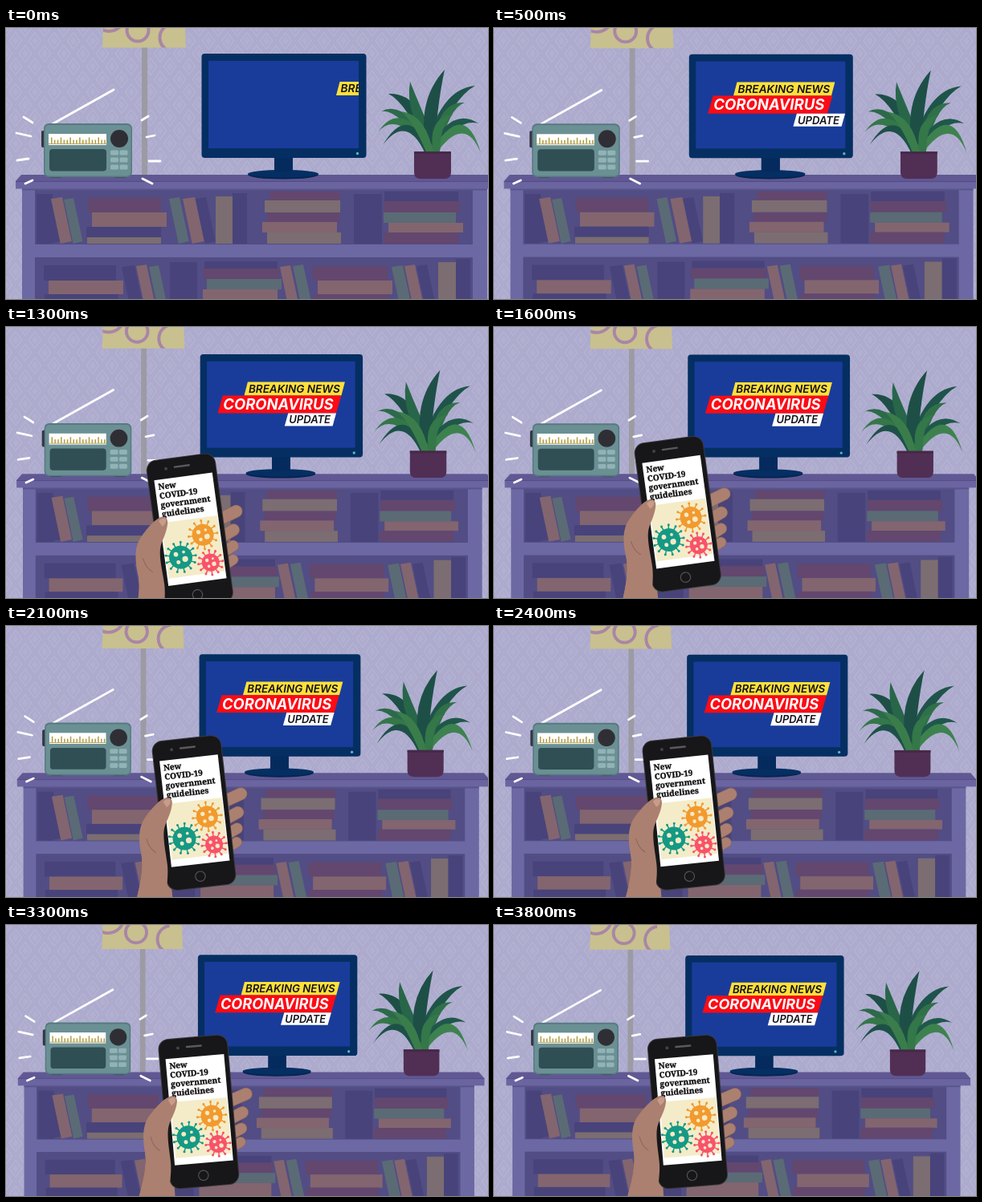
An HTML page with a canvas that plays this animation: 600x338 px, repeating every 3.9 s.

```html
<!DOCTYPE html>
<html lang="en">
<head>
<meta charset="utf-8">
<title>Staying informed at home</title>
<style>
html, body { margin: 0; width: 100%; height: 100%; overflow: hidden; background: #b1aed1; }
canvas { display: block; width: 600px; height: 338px; }
</style>
</head>
<body>
<canvas id="stage" width="600" height="338"></canvas>
<script>
const ctx = document.getElementById('stage').getContext('2d');
const LOOP = 3900, STEP = 100;

const clamp = v => Math.max(0, Math.min(1, v));
const easeOut = v => 1 - Math.pow(1 - clamp(v), 3);

function rect(x, y, w, h, fill) {
  ctx.fillStyle = fill;
  ctx.fillRect(x, y, w, h);
}

function rounded(x, y, w, h, r, fill) {
  ctx.beginPath();
  ctx.roundRect(x, y, w, h, r);
  ctx.fillStyle = fill;
  ctx.fill();
}

function ellipse(x, y, rx, ry, fill) {
  ctx.beginPath();
  ctx.ellipse(x, y, rx, ry, 0, 0, Math.PI * 2);
  ctx.fillStyle = fill;
  ctx.fill();
}

function arc(x, y, r, width, color, from = 0, to = Math.PI * 2) {
  ctx.beginPath();
  ctx.arc(x, y, r, from, to);
  ctx.lineWidth = width;
  ctx.strokeStyle = color;
  ctx.stroke();
}

function poly(points, fill) {
  ctx.beginPath();
  points.forEach(([x, y]) => ctx.lineTo(x, y));
  ctx.closePath();
  ctx.fillStyle = fill;
  ctx.fill();
}

function line(x1, y1, x2, y2, width, color, cap = 'butt') {
  ctx.beginPath();
  ctx.moveTo(x1, y1);
  ctx.lineTo(x2, y2);
  ctx.lineWidth = width;
  ctx.lineCap = cap;
  ctx.strokeStyle = color;
  ctx.stroke();
}

function path(d, fill, stroke, width = 1) {
  const p = new Path2D(d);
  if (fill) { ctx.fillStyle = fill; ctx.fill(p); }
  if (stroke) { ctx.strokeStyle = stroke; ctx.lineWidth = width; ctx.stroke(p); }
}

function text(str, x, y, font, fill) {
  ctx.font = font;
  ctx.fillStyle = fill;
  ctx.fillText(str, x, y);
}

// ---- Wallpaper ----
function diamond(x, y, w, h, color) {
  path(`M${x} ${y - h}L${x + w} ${y}L${x} ${y + h}L${x - w} ${y}Z`, null, color, 1.6);
}

function drawWall() {
  rect(0, 0, 600, 338, '#b2b0d1');
  for (let row = 0; row < 24; row++) {
    for (let col = 0; col < 27; col++) {
      const x = col * 24 + (row % 2) * 12, y = row * 16;
      diamond(x, y, 10.5, 14, '#aba8cc');
      diamond(x, y, 5, 7, '#acaacd');
    }
  }
}

// ---- Bookcase ----
const BOOK = { n: '#48437a', p: '#83656f', g: '#5a6b75', m: '#63476e', t: '#7b6d71' };

const UPPER_FLAT = [
  ['n', 38, 207, 20, 62], ['m', 102, 212, 91, 18], ['p', 107, 230, 93, 18], ['n', 100, 248, 93, 13],
  ['t', 101, 261, 92, 8], ['t', 261, 210, 21, 59], ['n', 282, 206, 18, 63], ['m', 328, 204, 88, 11],
  ['t', 322, 215, 94, 15], ['m', 325, 230, 90, 12], ['p', 319, 242, 93, 13], ['t', 325, 255, 92, 14],
  ['n', 433, 207, 35, 62], ['n', 471, 204, 92, 12], ['m', 471, 216, 94, 14], ['g', 470, 230, 90, 13],
  ['p', 476, 243, 93, 12], ['m', 470, 255, 93, 14]
];
const LOWER_FLAT = [
  ['n', 47, 296, 90, 19], ['p', 53, 315, 93, 17], ['n', 48, 332, 92, 15], ['n', 204, 292, 34, 55],
  ['n', 247, 291, 91, 9], ['m', 246, 300, 94, 13], ['g', 250, 313, 93, 13], ['p', 245, 326, 93, 21],
  ['m', 382, 297, 93, 18], ['p', 388, 315, 93, 17], ['m', 383, 332, 93, 15],
  ['t', 538, 292, 22, 55], ['n', 560, 288, 18, 59]
];
// color, left, top, thickness
const UPPER_LEANING = [
  ['n', 41, 213, 15], ['p', 56, 213, 14], ['g', 72, 214, 12],
  ['g', 203, 213, 13], ['p', 220, 213, 15], ['n', 236, 213, 13]
];
const LOWER_LEANING = [
  ['n', 144, 298, 16], ['p', 162, 297, 13], ['g', 178, 298, 12], ['p', 341, 298, 13],
  ['g', 357, 297, 13], ['g', 480, 298, 14], ['p', 496, 297, 13], ['n', 511, 297, 13]
];

function leaningBook([tone, x, top, w], floor) {
  const dx = (floor - top) * 0.21;
  poly([[x, top], [x + w, top - 2], [x + w + dx, floor - 3], [x + dx, floor]], BOOK[tone]);
}

function drawBookcase() {
  rect(20, 196, 579, 170, '#6c68a3');
  rect(36, 202, 545, 68, '#524d84');
  rect(36, 286, 545, 80, '#524d84');
  [...UPPER_FLAT, ...LOWER_FLAT].forEach(([tone, x, y, w, h]) => rect(x, y, w, h, BOOK[tone]));
  UPPER_LEANING.forEach(b => leaningBook(b, 269));
  LOWER_LEANING.forEach(b => leaningBook(b, 354));
  poly([[19, 183], [605, 183], [612, 191], [12, 191]], '#605893');
  rect(12, 191, 600, 9.5, '#6a65a1');
  rect(12, 191, 600, 1, '#544b86');
  rect(20, 200.5, 579, 2, '#5a548c');
}

// ---- Lamp ----
function drawLamp() {
  rect(169, 20, 7, 165, '#9c9aa3');
  ctx.save();
  ctx.beginPath();
  [[122, -30], [222, -30], [224, 24.5], [120, 24.5]].forEach(p => ctx.lineTo(...p));
  ctx.clip();
  rect(110, -40, 120, 70, '#c8c08f');
  arc(128, -16, 20, 4, '#a986a5');
  arc(164, 3, 13.5, 4, '#a986a5');
  arc(209, 12, 17.5, 4, '#a986a5', 1.5, 4.6);
  ctx.restore();
}

// ---- Radio ----
const RAYS = [
  [22, 111, 33, 118], [13, 131, 31, 135], [14, 165, 28, 163], [24, 194, 33, 190],
  [169, 115, 177, 110], [175, 136, 185, 134], [178, 166, 192, 166], [170, 188, 182, 194]
];

function drawRadio() {
  line(59, 119, 134, 77, 2.8, '#fff', 'round');
  rounded(44, 128, 6, 21, 2, '#343641');
  rect(55, 184, 14, 3, '#3d5960');
  rect(135, 184, 14, 3, '#3d5960');
  rounded(47, 119, 110, 67, 6, '#557a80');
  rounded(48.5, 121, 107, 63.5, 5, '#6b9094');
  rect(53, 132, 72, 14, '#fff');
  for (let i = 0; i < 18; i++) {
    const h = i % 3 ? 5 : 8;
    rect(56 + i * 3.9, 144.5 - h, 1.5, h, '#b39a3c');
  }
  rect(53, 144, 72, 1, '#b8aa69');
  ellipse(141, 138, 11, 11, '#302e35');
  rounded(54, 151, 71, 27.5, 4, '#304f55');
  for (let i = 0; i < 6; i++) {
    rounded(130 + (i % 2) * 11.5, 152.5 + Math.floor(i / 2) * 9, 10, 6, 1.5, '#91b3b6');
  }
  RAYS.forEach(ray => line(...ray, 2.8, '#fff', 'round'));
}

// ---- Television ----
const SANS = 'Inter, "Open Sans", sans-serif';
const BANNERS = [
  { str: 'BREAKING NEWS', x: 299, y: 67, w: 127, h: 17, slant: 4.5, font: '600 13.7px', pad: 5.5, base: 80.4, fill: '#ffe03a', ink: '#11121c', from: 112, start: 0, span: 400 },
  { str: 'CORONAVIRUS', x: 265.5, y: 84, w: 156, h: 22.3, slant: 6.5, font: '700 18.7px', pad: 7, base: 102, fill: '#fb0b15', ink: '#fff', from: 190, start: 100, span: 500 },
  { str: 'UPDATE', x: 350, y: 106.3, w: 65, h: 16.2, slant: 4.5, font: '600 13.2px', pad: 5.5, base: 119.2, fill: '#fff', ink: '#11121c', from: 110, start: 300, span: 500 }
];

function drawTV(t) {
  rect(334, 160, 23, 20, '#042654');
  ellipse(345, 183, 44, 5.5, '#03254f');
  ellipse(345, 181.8, 44, 4.8, '#052f62');
  rect(334, 162, 23, 17, '#052b5e');
  rounded(243.5, 32, 205, 130, 4, '#052f62');
  rect(252, 41, 187, 109, '#193c9b');
  ellipse(437.5, 156.5, 1.7, 1.7, '#5bb8b5');
  ctx.save();
  ctx.beginPath();
  ctx.rect(252, 41, 187, 109);
  ctx.clip();
  BANNERS.forEach(b => {
    const x = b.x + b.from * (1 - easeOut((t - b.start) / b.span));
    poly([[x + b.slant, b.y], [x + b.w, b.y], [x + b.w - b.slant, b.y + b.h], [x, b.y + b.h]], b.fill);
    text(b.str, x + b.pad, b.base, `italic ${b.font} ${SANS}`, b.ink);
  });
  ctx.restore();
}

// ---- Plant ----
// tip x, tip y, middle x, middle y, width, color
const LEAVES = [
  [584, 72, 551, 98, 10, '#1f544a'], [476, 82, 506, 103, 12, '#1d4f47'], [571, 93, 548, 110, 9, '#2f7049'],
  [588, 119, 558, 121, 9, '#1f584a'], [467, 104, 496, 112, 8, '#2c6a4a'], [503, 67, 513, 108, 11, '#286649'],
  [546, 52, 530, 100, 14, '#1d4f47'], [463, 130, 494, 118, 9, '#347748'], [469, 146, 499, 125, 8, '#1d5148'],
  [591, 156, 566, 126, 11, '#3d824e'], [556, 108, 539, 124, 9, '#347748'], [492, 104, 513, 122, 9, '#3a7d4b']
];

function drawPlant() {
  const rootY = 157;
  LEAVES.forEach(([x, y, mx, my, width, color], i) => {
    const root = 525 + (i * 5) % 13;
    const bx = 2 * mx - (root + x) / 2, by = 2 * my - (rootY + y) / 2;
    const length = Math.hypot(x - root, y - rootY);
    const nx = (y - rootY) / length * width, ny = (root - x) / length * width;
    path(`M${root - 4} ${rootY}Q${bx + nx} ${by + ny} ${x} ${y}Q${bx - nx} ${by - ny} ${root + 4} ${rootY}Z`, color);
  });
  path('M508 154H554V180Q554 188 546 188H516Q508 188 508 180Z', '#512f54');
  rect(508, 154, 46, 3, '#462848');
}

// ---- Phone and hand ----
const SKIN = '#ab8070', SKIN_DARK = '#8d6558';
const VIRUSES = [
  [15.6, 6.5, 13.5, '#f29a2e', 12], [-15.5, 30.5, 14.5, '#149985', 13], [20.5, 42, 11, '#f9526a', 12]
];

function drawVirus([x, y, r, color, count]) {
  for (let i = 0; i < count; i++) {
    const a = i / count * Math.PI * 2, c = Math.cos(a), s = Math.sin(a);
    line(x + c * r * 0.9, y + s * r * 0.9, x + c * (r + 4), y + s * (r + 4), 1.5, color);
    ellipse(x + c * (r + 4.3), y + s * (r + 4.3), 1.5, 1.5, color);
  }
  ellipse(x, y, r, r, color);
  [[-0.38, -0.3, 0.2], [0.3, -0.42, 0.13], [0.36, 0.2, 0.25], [-0.25, 0.4, 0.17]].forEach(([dx, dy, k]) =>
    ellipse(x + dx * r, y + dy * r, k * r, k * r, '#f5e9c5'));
}

function drawPhone() {
  ctx.save();
  ctx.translate(241, 233);
  ctx.rotate(-4.7 * Math.PI / 180);
  rounded(-43.5, -94, 87, 188, 13, '#3b393c');
  rounded(-42.5, -93, 85, 186, 12, '#171618');
  line(-8, -82, 10, -82, 2.4, '#5b595c', 'round');
  ellipse(-19, -81.5, 2, 2, '#434147');
  arc(-1, 79.5, 6.2, 1.2, '#555257');
  rect(-35.5, -69, 73, 133, '#fff');
  ctx.strokeStyle = '#111';
  ctx.lineWidth = 0.35;
  ['New', 'COVID-19', 'government', 'guidelines'].forEach((word, i) => {
    text(word, -31.5, -56.5 + i * 11.4, 'bold 10.1px "Noto Serif", serif', '#111');
    ctx.strokeText(word, -31.5, -56.5 + i * 11.4);
  });
  rect(-33.5, -15, 70, 70, '#f4ecc8');
  VIRUSES.forEach(drawVirus);
  ctx.restore();
}

function drawHand(t) {
  if (t < 1100) return;
  const rise = 230 * (1 - easeOut((t - 1000) / 550));
  const tilt = -3.0 * Math.exp(-Math.max(0, t - 1600) / 950) + 0.3 * clamp((t - 1600) / 2200);
  ctx.save();
  ctx.translate(240, 466 + rise);
  ctx.rotate(tilt * Math.PI / 180);
  ctx.translate(-240, -466);
  path('M158 366C169 330 177 304 174 283L206 260L213 366Z', SKIN);
  [[300, 211, 14.5], [295.5, 234, 14], [294, 254, 13], [293, 271, 12]].forEach(([x, y, w]) => {
    line(272, y + 12, x, y, w + 1.4, SKIN_DARK, 'round');
    line(272, y + 12, x, y, w, SKIN, 'round');
  });
  drawPhone();
  path('M155 370C169 333 177 306 174 284C170 263 172 247 180 237C189 225 199 215 207 213' +
    'Q215 213 214 221C213 231 207 241 204 249C200 262 205 283 206 298C207 317 202 335 196 370Z', SKIN);
  path('M203 218Q208 213 212 216Q213 221 207 225Z', '#c79d8a');
  path('M181 264Q184 276 192 281', null, SKIN_DARK, 1);
  ctx.restore();
}

function draw(t) {
  const scale = 1 - 0.037 * t / 3800;
  drawWall();
  ctx.save();
  ctx.translate(100, 195);
  ctx.scale(scale, scale);
  ctx.translate(-100, -195);
  drawLamp();
  drawBookcase();
  drawTV(t);
  drawPlant();
  drawRadio();
  ctx.restore();
  drawHand(t);
}

function tick() {
  draw(Math.floor(performance.now() % LOOP / STEP) * STEP);
  requestAnimationFrame(tick);
}
tick();
</script>
</body>
</html>
```
